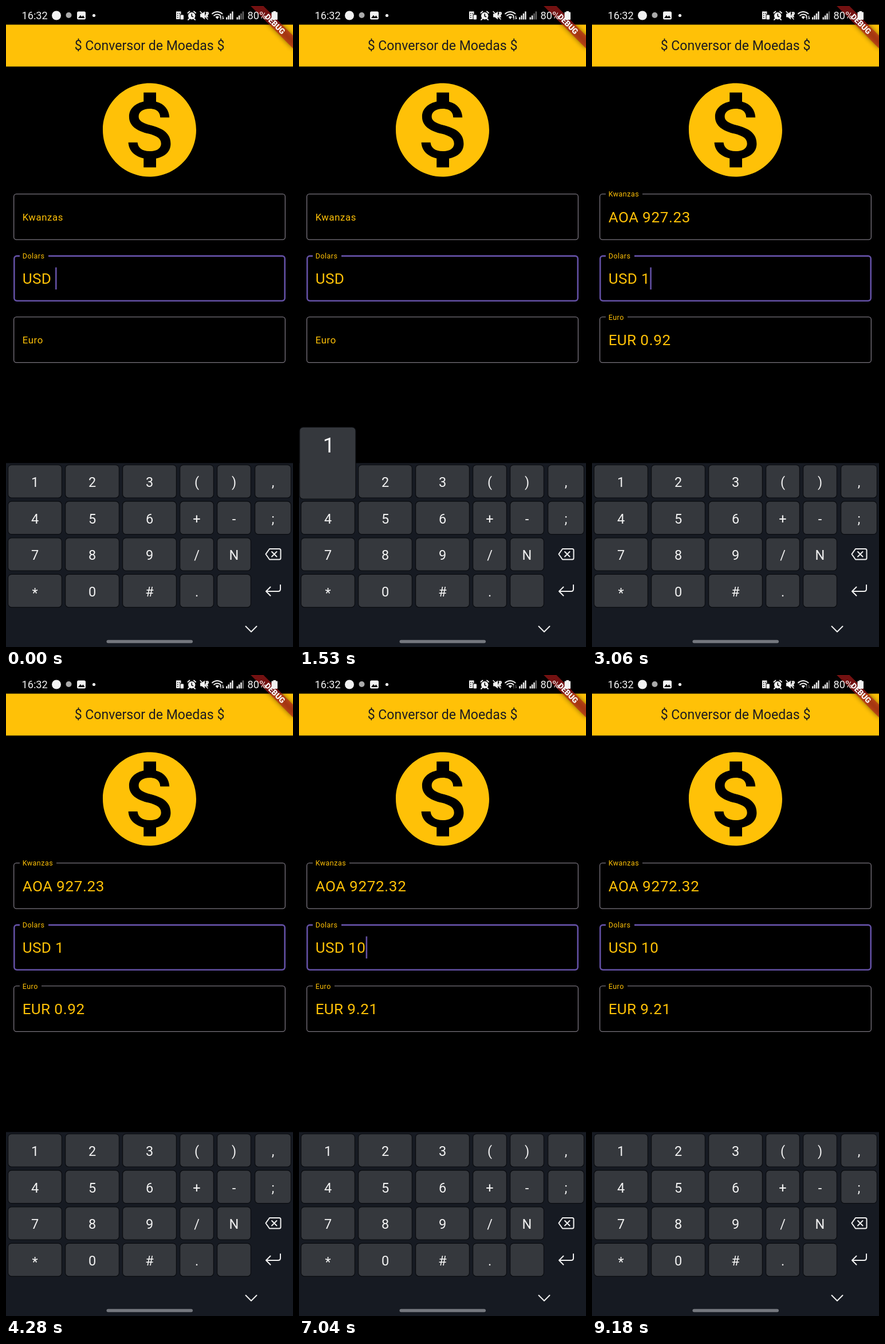
Animation of 501 by 1117 pixels, one loop 9.49 s. Source, as an HTML page:

```html
<!DOCTYPE html>
<html lang="pt">
<head>
<meta charset="utf-8">
<title>Conversor de Moedas</title>
<style>
  html, body { margin: 0; width: 100%; height: 100%; overflow: hidden; background: #000; }
  svg { display: block; width: 501px; height: 1117px; font-family: Roboto, sans-serif; }
  text { white-space: pre; }
  .mid { text-anchor: middle; }
  .amber { fill: #ffc107; }
  .label { font-size: 16.7px; letter-spacing: .65px; }
  .small { font-size: 12.5px; letter-spacing: .49px; }
  .value { font-size: 26.1px; letter-spacing: .65px; }
  .prefix { letter-spacing: .33px; }
  .frame { fill: none; stroke: #79747e; stroke-width: 1.3; }
  .focus { stroke: #6350a4; stroke-width: 2.6; }
  .key { fill: #35383d; stroke: #0a0c10; stroke-width: 1.2; }
  .glyph { fill: #f2f2f2; font-size: 23.5px; }
  .line { fill: none; stroke: #f0f0f0; stroke-width: 2; stroke-linejoin: round; stroke-linecap: round; }
  .thin { stroke-width: 1.6; }
</style>
</head>
<body>
<svg viewBox="0 0 501 1117">
  <defs>
    <filter id="soft" x="-20%" y="-100%" width="140%" height="300%"><feGaussianBlur stdDeviation="4.5"/></filter>
  </defs>
  <rect width="501" height="1117"/>
  <rect y="32.5" width="501" height="73" class="amber"/>
  <text x="250.5" y="77.2" class="mid" font-size="23.05" fill="#1d1b20">$ Conversor de Moedas $</text>

  <path class="amber" transform="translate(152.7 118.2) scale(8.15)" d="M12 2C6.48 2 2 6.48 2 12s4.48 10 10 10 10-4.48 10-10S17.52 2 12 2zm1.41 16.09V20h-2.67v-1.93c-1.71-.36-3.16-1.46-3.27-3.4h1.96c.1 1.05.82 1.87 2.65 1.87 1.96 0 2.4-.98 2.4-1.59 0-.83-.44-1.61-2.67-2.14-2.48-.6-4.18-1.62-4.18-3.67 0-1.72 1.39-2.84 3.11-3.21V4h2.67v1.95c1.86.45 2.79 1.86 2.85 3.39H14.3c-.05-1.11-.64-1.87-2.22-1.87-1.5 0-2.4.68-2.4 1.64 0 .84.65 1.39 2.67 1.91s4.18 1.39 4.18 3.91c-.01 1.83-1.38 2.83-3.12 3.16z"/>

  <g id="fields"></g>
  <rect id="caret" y="455.5" width="2.6" height="38.5" fill="#6350a4"/>

  <rect y="796.5" width="501" height="321" fill="#161a22"/>
  <g id="keys"></g>
  <g class="line">
    <path d="M460 946h17q2.500 0 2.500 2.500v13.500q0 2.500-2.500 2.500h-17l-6.500-9.300zM464 951l8.500 8.500m0-8.500l-8.500 8.500"/>
    <path d="M479 1009v7q0 4-4 4h-21m7.500-7.500l-7.500 7.500 7.500 7.500"/>
    <path d="M418.500 1081l9.500 9.500 9.500-9.500"/>
  </g>
  <rect x="175.500" y="1104.700" width="150.500" height="5.500" rx="2.750" fill="#74777e"/>
  <g id="popup">
    <rect width="98" height="125" rx="6" class="key"/>
    <text x="51" y="44" class="mid" font-size="36.500" fill="#f5f5f5"></text>
  </g>

  <g transform="translate(501 0) rotate(45)">
    <rect x="-52" y="36.500" width="104" height="15.700" fill="#000" opacity=".5" filter="url(#soft)"/>
    <rect x="-52" y="36.500" width="104" height="15.700" fill="#b71c1c" fill-opacity=".63"/>
    <text y="49.200" class="mid" font-size="13.600" font-weight="900" fill="#fff">DEBUG</text>
  </g>

  <g fill="#f2f2f2">
    <text x="27.500" y="23" font-size="18.200">16:32</text>
    <circle cx="88" cy="16.500" r="8"/>
    <circle cx="109.500" cy="16" r="5" fill="#aaa"/>
    <rect x="124" y="9.500" width="15" height="14" rx="2.500"/>
    <path d="M126 21l4-5 2.500 3 2-2.500 3 4.500z" fill="#000"/>
    <circle cx="153.500" cy="16.500" r="2.600"/>

    <path d="M297 9.500h8.500v5h-2v8.500h-6.500z"/>
    <rect x="304.500" y="15.500" width="5.500" height="8" rx="1"/>
    <path d="M299 13h1.500m2 0h1.500m-5 3.500h1.500m-1.500 3.500h1.500" stroke="#000" stroke-width="1.500"/>
    <circle cx="324.200" cy="17.200" r="6.200"/>
    <path d="M317.500 12l3-2.500m7.500 0l3 2.500m-11 10l-2 2m10-2l2 2" class="line"/>
    <path d="M324.200 13.500v4.200l2.800 1.300" fill="none" stroke="#000" stroke-width="1.500"/>
    <path d="M339 13.500h3l5-4v14l-5-4h-3z"/>
    <path d="M339 9.500l13 13.500" class="line thin"/>
    <path d="M349.500 11q2 2 0 4t0 4m2.500-8q2 2 0 4t0 4" class="line" stroke-width="1.200"/>

    <path d="M360 13.500q8.500-7 17.500 0m-14.500 3.200q5.500-4.500 11.500 0" class="line"/>
    <path d="M365.500 19q3.200-2.500 6.500 0l-3.200 4z"/>
    <path id="traffic" d="M375 23v-5l-1.500 1.500m5-2v5l1.500-1.500" class="line" style="stroke-width:1.300"/>
    <g id="bars"></g>
    <text x="421.500" y="23" font-size="18.200">80%</text>
    <path d="M466.500 9h4.500v1.500h2q1 0 1 1v11.500q0 1-1 1h-8.500q-1 0-1-1v-11.500q0-1 1-1h2z"/>
  </g>
</svg>

<script>
const LOOP = 9490;
const $ = id => document.getElementById(id);

// Input fields: top edge, label, label gap, currency code
const FIELDS = [
  { top: 327, name: 'Kwanzas', gap: 64, code: 'AOA' },
  { top: 434.3, name: 'Dolars', gap: 50, code: 'USD', focus: true },
  { top: 541.3, name: 'Euro', gap: 38, code: 'EUR' }
];
$('fields').innerHTML = FIELDS.map(({ top, name, gap, code, focus }) => {
  const w = focus ? 2.6 : 1.3;
  return `<g>
    <rect class="frame ${focus ? 'focus' : ''}" x="${13 + w / 2}" y="${top + w / 2}"
      width="${475 - w}" height="${80.7 - w}" rx="4.600"/>
    <g class="floated"><rect x="24" y="${top - 3}" width="${gap}" height="9"/>
      <text class="amber small" x="28.700" y="${top + 5.3}">${name}</text></g>
    <text class="amber label resting" x="28.700" y="${top + 46.8}">${name}</text>
    <text class="amber value" x="28.700" y="${top + 49.7}"><tspan class="prefix">${code} </tspan><tspan class="amount"></tspan></text>
  </g>`;
}).join('');
const fields = [...$('fields').children].map(g => ({
  floated: g.querySelector('.floated'),
  resting: g.querySelector('.resting'),
  prefix: g.querySelector('.prefix'),
  amount: g.querySelector('.amount')
}));

// Keypad: column left edge and width, rows of symbols; "_" leaves room for an icon
const COLS = [[4, 93], [104, 93], [204, 93], [304, 58], [369, 58], [435, 62]];
const ROWS = ['123(),', '456+-;', '789/N_', '*0#. _'];
const keyTop = row => 800 + row * 63.6;
$('keys').innerHTML = ROWS.map((row, r) => [...row].map((ch, c) => {
  if (ch === '_') return '';
  const [x, w] = COLS[c], y = keyTop(r);
  return `<rect class="key" x="${x - .4}" y="${y - .4}" width="${w + .8}" height="57.400" rx="6"/>
    <text class="glyph mid" x="${x + w / 2}" y="${y + (ch === '*' ? 40 : 38)}">${ch}</text>`;
}).join('')).join('');

// Two sets of signal bars
$('bars').innerHTML = [384, 402.5].map((x, set) => [4, 7, 10.5, 14].map((h, i) =>
  `<rect x="${x + i * 3.4}" y="${23.5 - h}" width="2.400" height="${h}" fill="${set && i > 1 ? '#666' : '#f2f2f2'}"/>`
).join('')).join('');
const weakBar = $('bars').children[6];

// Each row holds from its time until the next one
const AMOUNTS = [
  [0, ['', '', '']],
  [2140, ['927.23', '1', '0.92']],
  [5510, ['9272.32', '10', '9.21']]
];
const PRESSES = [
  { from: 1530, to: 1840, key: '1', col: 0, row: 0 },
  { from: 4590, to: 5200, key: '0', col: 1, row: 3 }
];
const BLINKS = [310, 920, 1530, 1840, 2450, 3060, 3370, 3670, 4280, 4590,
  5510, 5810, 6420, 7040, 7340, 7650, 8260, 8870, 9180];
const FLOAT_AT = 2450, SIGNAL_AT = 2750, WIFI_AT = 6730;

const show = (el, on) => el.setAttribute('visibility', on ? 'visible' : 'hidden');

function render(t) {
  const amounts = AMOUNTS.filter(([at]) => at <= t).pop()[1];
  fields.forEach((f, i) => {
    const floating = FIELDS[i].focus || t >= FLOAT_AT;
    show(f.floated, floating);
    show(f.resting, !floating);
    f.prefix.style.fill = floating ? '' : 'transparent';
    if (f.amount.textContent !== amounts[i]) f.amount.textContent = amounts[i];
  });

  $('caret').setAttribute('x', 86 + amounts[1].length * 15.3);
  show($('caret'), BLINKS.filter(at => at <= t).length % 2 === 0);

  const press = PRESSES.find(p => t >= p.from && t < p.to);
  show($('popup'), press);
  if (press) {
    $('popup').setAttribute('transform', `translate(${COLS[press.col][0] - 3} ${keyTop(press.row) - 66})`);
    $('popup').lastElementChild.textContent = press.key;
  }

  weakBar.setAttribute('fill', t >= SIGNAL_AT ? '#f2f2f2' : '#666');
  $('traffic').setAttribute('opacity', t >= WIFI_AT ? .35 : 1);
}

const start = performance.now();
function tick() {
  render((performance.now() - start) % LOOP);
  requestAnimationFrame(tick);
}
tick();
</script>
</body>
</html>
```
